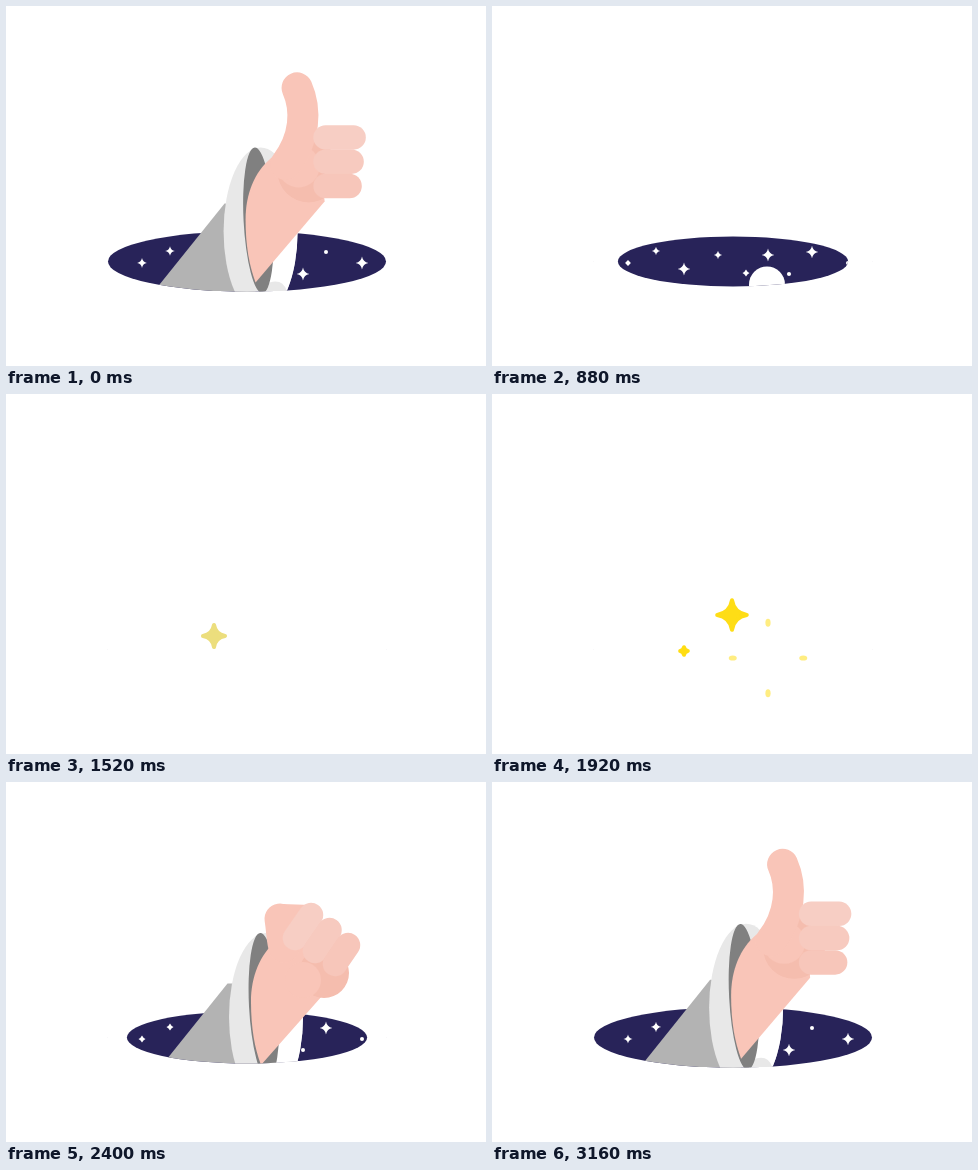
Recreate the animation shown at these times as an HTML page. Size 480 by 360 pixels, loop 3.2 s.

```html
<!DOCTYPE html>
<html lang="en">
<head>
<meta charset="utf-8">
<title>Thumbs up</title>
<style>
  html, body { margin: 0; width: 100%; height: 100%; overflow: hidden; background: #fff; }
  svg { display: block; width: 100vw; height: 100vh; }
</style>
</head>
<body>
<svg viewBox="0 0 480 360">
  <defs>
    <clipPath id="holeClip"><ellipse class="hole"/></clipPath>
    <clipPath id="armClip"><path id="armMask"/></clipPath>
  </defs>
  <ellipse class="hole" fill="#282359"/>
  <g clip-path="url(#holeClip)">
    <g id="night" fill="#fff"></g>
    <ellipse id="dome" cx="275" rx="18" ry="18" fill="#fff"/>
  </g>
  <g clip-path="url(#armClip)">
    <g id="arm">
      <path id="sleeve" fill="#b3b3b3" d="M219 197L126 313H250V197Z"/>
      <g id="cuff">
        <ellipse cx="255" cy="225" rx="37" ry="84" fill="#e8e8e8"/>
        <path fill="#fff" d="M258 225H292A37 84 0 0 1 258 309Z"/>
        <path fill="#e8e8e8" d="M264 276Q277 272 281 284V290H258Z"/>
        <ellipse cx="253" cy="214" rx="15" ry="73" fill="#808080" transform="rotate(-3 253 214)"/>
      </g>
      <path id="palm" fill="#f9c5b8"/>
      <circle id="shade" fill="#f5bdae"/>
      <circle id="mound" fill="#f9c5b8"/>
      <path id="thumb" fill="none" stroke="#f9c5b8" stroke-width="31" stroke-linecap="round"/>
      <g id="fingers" stroke-width="24.5" stroke-linecap="round"></g>
    </g>
  </g>
  <g id="sparks"></g>
</svg>
<script>
const LOOP = 3200;
const $ = id => document.getElementById(id);
const span = (t, a, b) => Math.min(1, Math.max(0, (t - a) / (b - a)));
const smooth = u => u * u * (3 - 2 * u);
const easeOut = u => 1 - (1 - u) ** 2;
const mix = (a, b, u) => a.map((v, i) => v + (b[i] - v) * u);
const move = (x, y) => ({ transform: `translate(${x} ${y})` });
const show = on => on ? 'visible' : 'hidden';

function set(el, attrs) {
  for (const key in attrs) el.setAttribute(key, attrs[key]);
}
function add(parent, name, attrs = {}) {
  const el = document.createElementNS('http://www.w3.org/2000/svg', name);
  set(el, attrs);
  parent.append(el);
  return el;
}
const star = (x, y, r, c) =>
  `M${x} ${y - r}Q${x + c} ${y - c} ${x + r} ${y}Q${x + c} ${y + c} ${x} ${y + r}` +
  `Q${x - c} ${y + c} ${x - r} ${y}Q${x - c} ${y - c} ${x} ${y - r}Z`;

const fingers = [0, 1, 2].map(i =>
  add($('fingers'), 'line', { stroke: `rgb(247,${206 - 4 * i},${196 - 5 * i})` }));

// x, y, phase of the twinkle
const night = [
  [136, 257, .2], [164, 245, .8], [192, 263, .55], [226, 249, .3], [254, 267, .25],
  [276, 249, .55], [297, 268, 0], [320, 246, .5], [356, 257, 0]
].map(([x, y, phase]) => ({ x, y, phase, el: add($('night'), 'path') }));

// x, y, start
const sparks = [
  [247, 250, 1130], [208, 242, 1340], [276, 264, 1580],
  [240, 221, 1760], [192, 257, 1880], [287, 242, 1925]
].map(([x, y, start]) => ({
  x, y, start,
  core: add($('sparks'), 'path', { 'stroke-width': 4, 'stroke-linejoin': 'round' }),
  dots: [0, 1, 2, 3].map(() => add($('sparks'), 'ellipse', { fill: '#fd1' }))
}));

function drawHole(t) {
  const open = t < 1600 ? 1 - span(t, 740, 1080) ** 2 : easeOut(span(t, 2240, 2495));
  const cx = 241, cy = 255.5, rx = 139 * open, ry = 30.2 * open;
  document.querySelectorAll('.hole').forEach(el => set(el, { cx, cy, rx, ry }));
  set($('armMask'), { d: `M${cx - rx} 0H${cx + rx}V${cy}A${rx} ${ry} 0 0 1 ${cx - rx} ${cy}Z` });

  for (const s of night) {
    const r = 4.2 + 2.2 * Math.cos((t / 1600 - s.phase) * 2 * Math.PI);
    // Small stars round off into dots
    set(s.el, { d: star(s.x, s.y, r, Math.max(.15 * r, r - (r - 2) * 1.6)) });
  }
  set($('dome'), { cy: 278 + (t - 880) * .4, visibility: show(t > 820 && t < 1100) });
}

function drawArm(t) {
  const rising = t > 1600;
  const fist = rising ? 1 - smooth(span(t, 2410, 2640)) : smooth(span(t, 660, 780));
  const drop = rising ? 210 * (1 - easeOut(span(t, 2270, 2400))) : 240 * span(t, 680, 860) ** 2;
  const sway = (-1.2 + 1.6 * Math.sin(t * Math.PI / 400 + .5)) * (1 - fist);
  const pose = (up, closed) => mix(up, closed, fist);

  set($('arm'), move(sway, drop - .9 * sway));
  set($('sleeve'), move(2.5 * fist, 4.5 * fist));
  set($('cuff'), move(5 * fist, 10 * fist));

  const wrist = pose([265, 152], [270, 159]);
  const edge = pose([319, 195, 314, 122, 290, 135], [316, 214, 305, 123, 276, 122]);
  set($('palm'), { d: `M${wrist}c-16 14-25 35-25 61c0 27 4 47 10 63L${edge}Z` });

  const [x, y, ...bend] = pose(
    [291.5, 81.5, 301, 103, 300, 132, 280, 158],
    [274, 137, 276, 150, 276, 160, 278, 165]);
  set($('thumb'), { d: `M${x} ${y}C${bend}` });

  const ball = (id, up, closed) => {
    const [cx, cy, r] = pose(up, closed);
    set($(id), { cx, cy, r });
  };
  ball('shade', [303, 165, 31], [318, 191, 25]);
  ball('mound', [293, 160, 21], [297, 198, 18]);

  fingers.forEach((el, i) => {
    const row = 131 + 24.3 * i;
    const [x1, y1, x2, y2] = pose(
      [320, row, 348 - 2 * i, row],
      [289 + 20 * i, 156 + 13 * i, 305 + 18.5 * i, 133 + 15 * i]);
    set(el, { x1, y1, x2, y2 });
  });
}

function drawSpark({ x, y, start, core, dots }, t) {
  const age = t - start;
  const r = 15 * span(age, 0, 160) * (1 - span(age, 160, 240));
  const color = `rgb(${mix([255, 221, 17], [232, 222, 146], span(age, 160, 185))})`;
  set(core, {
    d: star(x, y, r, .14 * r), fill: color, stroke: color,
    visibility: show(age > 0 && age < 240)
  });

  const burst = span(age, 200, 380);
  const reach = 37 * easeOut(burst);
  dots.forEach((dot, i) => {
    const dx = Math.round(Math.cos(i * Math.PI / 2));
    const dy = Math.round(Math.sin(i * Math.PI / 2));
    set(dot, {
      cx: x + dx * reach, cy: y + dy * reach,
      rx: dx ? 4 : 2.6, ry: dy ? 4 : 2.6,
      opacity: 1 - .6 * burst,
      visibility: show(burst > 0 && burst < 1)
    });
  });
}

const begin = performance.now();
function tick() {
  const t = (performance.now() - begin) % LOOP;
  drawHole(t);
  drawArm(t);
  sparks.forEach(s => drawSpark(s, t));
  requestAnimationFrame(tick);
}
tick();
</script>
</body>
</html>
```
